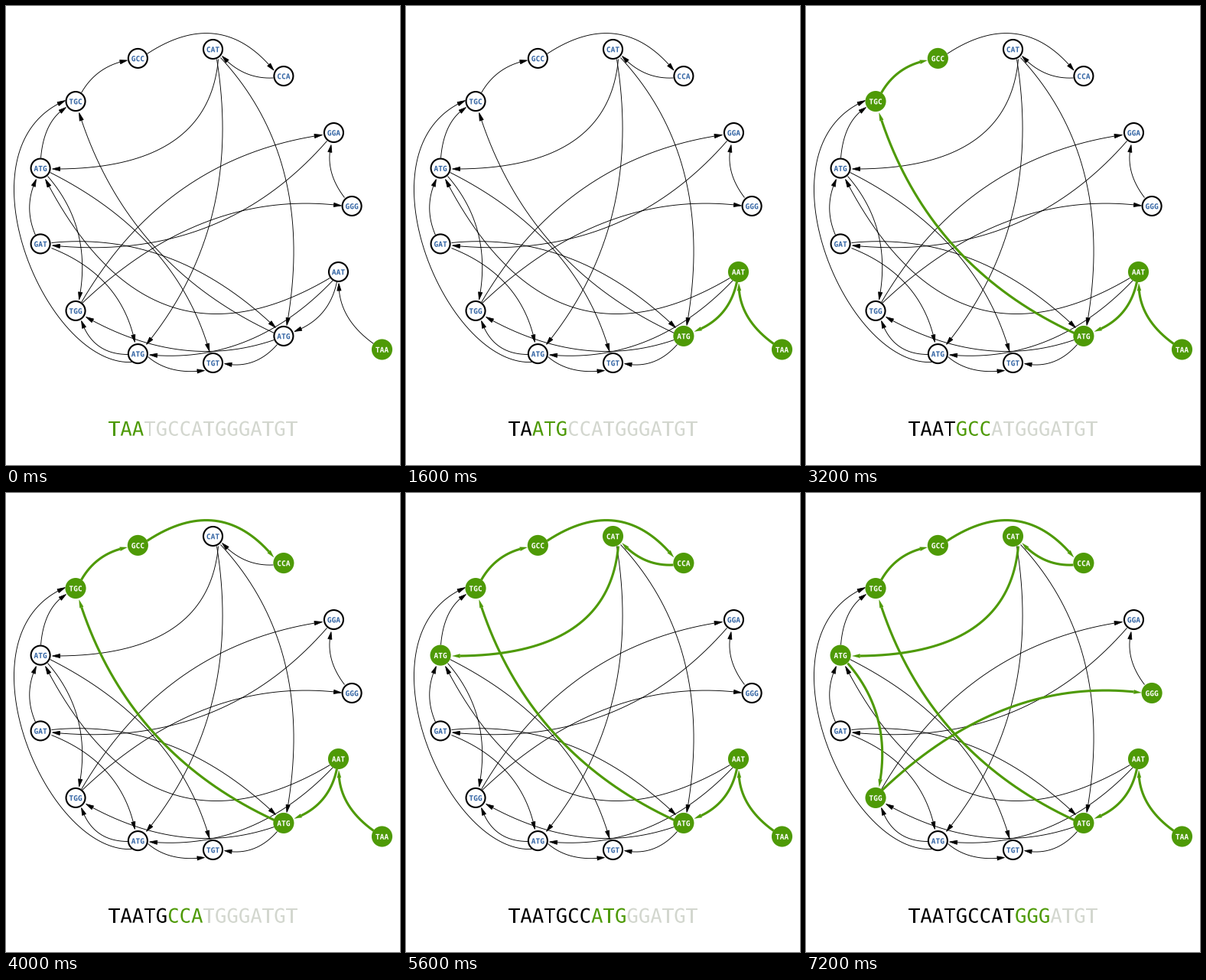
These frames come from a looping animation (515 by 600 pixels, 8000 ms). A matplotlib script:

```python
import math

import matplotlib.pyplot as plt
import numpy as np
from matplotlib.animation import FuncAnimation
from matplotlib.patches import Circle, PathPatch, Polygon
from matplotlib.path import Path
from matplotlib.textpath import TextPath

W, H, DPI = 515, 600, 100
PX = 72 / DPI
GREEN, BLUE, GREY = "#4e9a06", "#3465a4", "#d3d7cf"
SEQ = "TAATGCCATGGGATGT"
ADVANCE = 0.602  # glyph width of the mono font, in em

# Ring order is counterclockwise from the right; digits tell repeated k-mers apart.
RING = ["GGG", "GGA", "CCA", "CAT", "GCC", "TGC", "ATG1",
        "GAT", "TGG", "ATG2", "TGT", "ATG3"]
WALK = ["TAA", "AAT", "ATG3", "TGC", "GCC", "CCA", "CAT", "ATG1", "TGG", "GGG"]

# Bezier points of each edge, from node border to arrow tip
EDGES = {
    ("TAA", "AAT"): [(480, 441), (434, 408), (434.5, 362)],
    ("AAT", "ATG3"): [(432, 360), (422, 408), (376.5, 425)],
    ("AAT", "ATG2"): [(427, 358), (322, 468), (187, 455.5)],
    ("AAT", "ATG1"): [(423, 355), (189, 493), (51, 226)],
    ("ATG1", "TGC"): [(45, 198), (49, 150), (78, 132)],
    ("ATG1", "TGG"): [(54, 222), (113, 290), (95, 383.5)],
    ("ATG1", "TGT"): [(57, 217), (222, 300), (265.5, 451)],
    ("ATG2", "TGC"): [(164, 465), (51, 471), (-68, 185), (77, 123)],
    ("ATG2", "TGG"): [(159, 455), (113, 455), (98, 411)],
    ("ATG2", "TGT"): [(185, 458), (213, 482), (259, 476)],
    ("ATG3", "TGC"): [(350, 427), (158, 338), (95, 139)],
    ("ATG3", "TGG"): [(350, 436), (230, 477), (104, 406)],
    ("ATG3", "TGT"): [(354, 442), (325, 475), (285, 467)],
    ("TGC", "GCC"): [(98, 113), (118, 78), (158, 70.5)],
    ("GCC", "CCA"): [(184, 62), (280, -1), (349.5, 83.5)],
    ("CCA", "CAT"): [(349, 93.5), (310, 95.5), (282, 65)],
    ("CAT", "ATG1"): [(277, 69), (264, 214), (60, 212.5)],
    ("CAT", "ATG2"): [(275, 69), (310, 285), (183, 442)],
    ("CAT", "ATG3"): [(280, 67), (405, 202), (366.5, 417)],
    ("TGG", "GGG"): [(99, 388), (257, 238), (438, 260.5)],
    ("TGG", "GGA"): [(98, 387), (208, 198), (413, 168)],
    ("GGG", "GGA"): [(442, 250), (416, 216), (424.5, 181)],
    ("GGA", "GAT"): [(419, 176), (280, 335), (60, 312.5)],
    ("GAT", "ATG1"): [(38, 299), (22, 262), (39, 226)],
    ("GAT", "ATG2"): [(59, 316), (150, 352), (168, 439)],
    ("GAT", "ATG3"): [(59, 309), (219, 293), (352, 420)],
}


def node_places():
    slots = RING + [None]  # the last slot of the ring holds the shifted AAT
    places = {"AAT": (434.5, 347.5), "TAA": (491.5, 449)}
    for i, name in enumerate(slots):
        a = 2 * math.pi * i / len(slots)
        if name:
            places[name] = (245.6 + 206.5 * math.cos(a), 261.5 - 206.5 * math.sin(a))
    return places


def bezier(points, steps=400):
    t = np.linspace(0, 1, steps)[:, None]
    n = len(points) - 1
    return sum(math.comb(n, k) * (1 - t) ** (n - k) * t ** k * np.array(p)
               for k, p in enumerate(points))


def add_text(text, x, baseline, size, weight="normal", z=5):
    prop = {"family": "DejaVu Sans Mono", "weight": weight}
    glyphs = TextPath((0, 0), text, size=size, prop=prop)
    path = Path(glyphs.vertices * [1, -1] + [x, baseline], glyphs.codes)
    return ax.add_patch(PathPatch(path, lw=0, zorder=z))


def add_edge(points):
    curve = bezier(points) + 0.5  # pixel centres
    tip = curve[-1]
    body = curve[np.hypot(*(curve - tip).T) >= 9.5]
    base = body[-1]
    along = (tip - base) / np.hypot(*(tip - base))
    side = 2.6 * np.array([-along[1], along[0]])
    line, = ax.plot(*body.T, solid_capstyle="butt")
    head = ax.add_patch(Polygon([base + side, tip, base - side]))
    return line, head


def add_node(name, place):
    x, y = place
    disc = ax.add_patch(Circle(place, 12.5, lw=2.1 * PX, zorder=4))
    size = 9.6
    label = add_text(name[:3], x - 1.5 * ADVANCE * size, y + 3.8, size, "bold")
    return disc, label


fig = plt.figure(figsize=(W / DPI, H / DPI), dpi=DPI, facecolor="white")
ax = fig.add_axes([0, 0, 1, 1])
ax.axis("off")

edges = {key: add_edge(points) for key, points in EDGES.items()}
nodes = {name: add_node(name, place) for name, place in node_places().items()}
SIZE = 25.67
STEP = ADVANCE * SIZE
letters = [add_text(c, W / 2 + (i - len(SEQ) / 2) * STEP, 561.6, SIZE)
           for i, c in enumerate(SEQ)]
ax.set_xlim(0, W)
ax.set_ylim(H, 0)


def draw(step):
    walked = WALK[:step + 1]
    lit_edges = set(zip(walked, walked[1:]))
    for key, (line, head) in edges.items():
        lit = key in lit_edges
        color = GREEN if lit else "black"
        line.set(color=color, lw=(3.1 if lit else 0.9) * PX, zorder=3 if lit else 2)
        head.set(color=color, lw=(0.2 if lit else 0.8) * PX, zorder=3 if lit else 2)
    for name, (disc, label) in nodes.items():
        lit = name in walked
        disc.set(facecolor=GREEN if lit else "white",
                 edgecolor=GREEN if lit else "black")
        label.set_facecolor("white" if lit else BLUE)
    for i, letter in enumerate(letters):
        letter.set_facecolor("black" if i < step else GREEN if i < step + 3 else GREY)
    return []


anim = FuncAnimation(fig, draw, frames=len(WALK), init_func=lambda: draw(0),
                     interval=800, repeat=True, repeat_delay=0)
plt.show()
```
